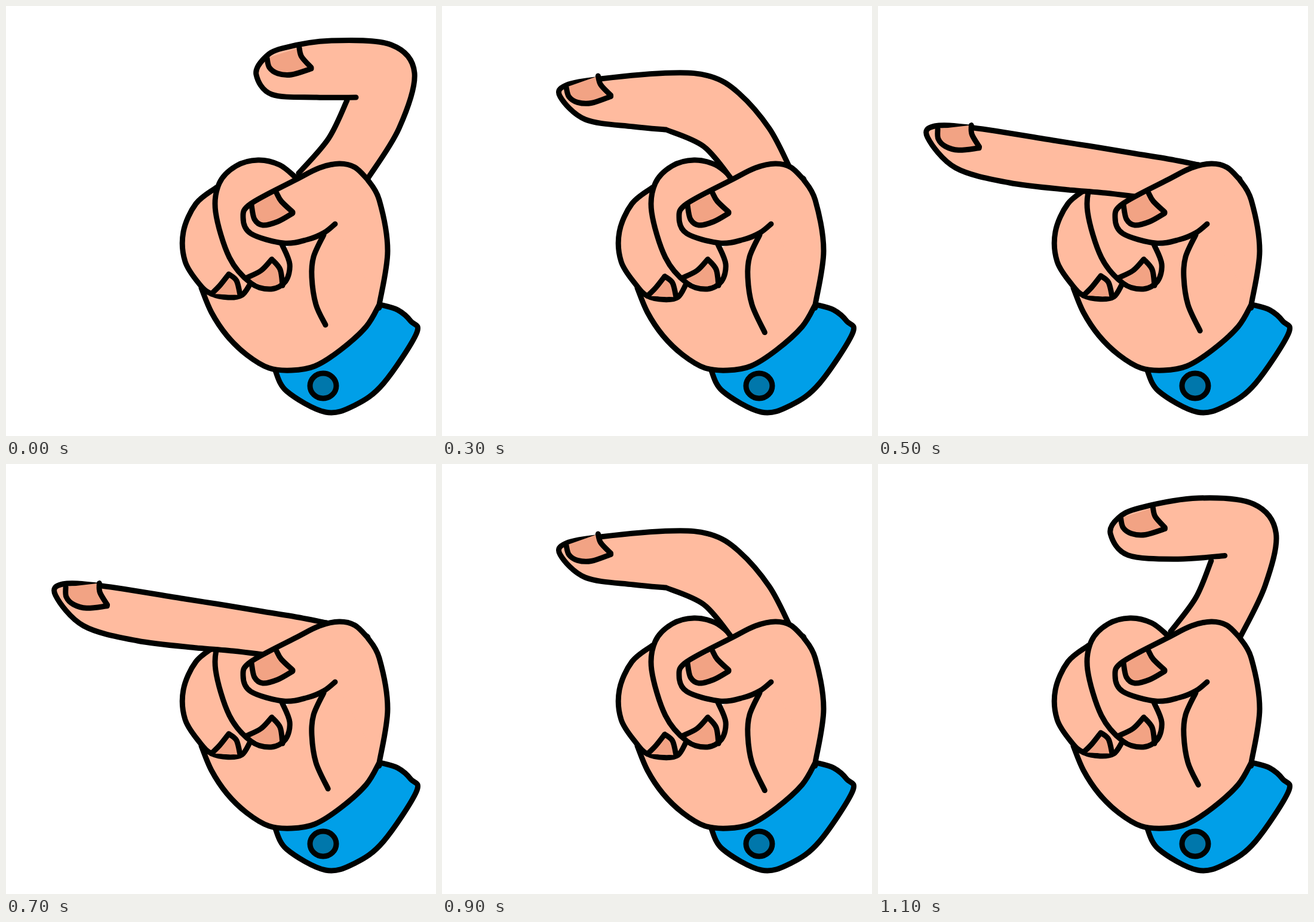
Animation of 720 by 720 pixels, one loop 1200 ms. Source, as an HTML page:

```html
<!DOCTYPE html>
<html lang="en">
<head>
<meta charset="utf-8">
<title>Beckoning finger</title>
<style>
  html, body { margin: 0; width: 100%; height: 100%; overflow: hidden; background: #fff; }
  svg { display: block; width: 100vw; height: 100vh; }
  path, ellipse { stroke: #000200; stroke-width: 9; stroke-linecap: round; stroke-linejoin: round; }
  .line { fill: none; }
  .flat { stroke: none; }
  .skin { fill: #ffbb9f; }
  .nail { fill: #f2a384; }
  .cuff { fill: #009fe8; }
  .button { fill: #0077ab; }
  /* Poses stand side by side; the strip steps out and back. */
  #strip { animation: beckon 1200ms infinite; }
  @keyframes beckon {
    0% { transform: translateX(0); animation-timing-function: steps(6, end); }
    50% { transform: translateX(-4320px); animation-timing-function: steps(6, end); }
    100% { transform: translateX(0); }
  }
</style>
</head>
<body>
<svg viewBox="0 0 720 720"><g id="strip"></g></svg>
<script>
const points = text => text.split(' ').map(p => p.split(',').map(Number));

// Smooth curve through the points, as cubic segments
function curve(pts, start = 'M') {
  const at = i => pts[Math.max(0, Math.min(pts.length - 1, i))];
  let d = start + pts[0];
  for (let i = 0; i < pts.length - 1; i++) {
    const [a, b, c, e] = [-1, 0, 1, 2].map(k => at(i + k));
    const c1 = b.map((v, k) => v + (c[k] - a[k]) / 6);
    const c2 = c.map((v, k) => v - (e[k] - b[k]) / 6);
    d += `C${c1} ${c2} ${c}`;
  }
  return d;
}

// Curves separated by "|" meet in a corner
const smooth = text => text.split('|').map((s, i) => curve(points(s), i ? 'L' : 'M')).join('');

// Blend two poses of the same structure; t above 1 overshoots
function mix(a, b, t) {
  if (typeof a === 'number') return a + (b - a) * t;
  if (Array.isArray(a)) return a.map((v, i) => mix(v, b[i], t));
  return Object.fromEntries(Object.keys(a).map(k => [k, mix(a[k], b[k], t)]));
}

// nail: x, y, angle; sag: how far the ring finger and palm crease drop
const pose = (finger, fold, nail, sag) => ({ finger: points(finger), fold: points(fold), nail, sag });

const curled = pose(
  '605,290 658,205 684,112 645,65 545,58 462,71 432,88 419,115 445,148 520,153 586,153',
  '571,158 540,222 490,280', [437, 87, 0], 0);
const hooked = pose(
  '611,291 615,200 608,130 576,74 510,54 361,81 300,101 290,125 330,168 440,180 563,155',
  '514,175 506,230 490,282', [304, 102, 0], 1);
const arched = pose(
  '582,270 548,205 497,146 450,118 385,112 265,122 207,133 198,152 240,190 320,202 375,207',
  '375,207 438,235 485,290', [208, 136, -2], 0.9);
const straight = pose(
  '537,266 480,255 430,247 370,237 300,226 160,204 95,201 83,220 130,271 220,296 320,308',
  '320,308 380,313 430,319', [100, 206, 11], 0.7);

const poses = [
  curled, mix(curled, hooked, 0.23), hooked,
  arched, mix(arched, straight, 0.55), straight, mix(arched, straight, 1.25)
];

const path = (kind, d) => `<path class="${kind}" d="${d}"/>`;
const nail = d => path('nail flat', d + 'Z') + path('line', d);

const palm = '327,472 344,513 370,552 403,584 440,606 478,610 517,603 560,576 603,537 625,500';
const side = '625,500 639,410 625,325 605,290';
const thumb = '605,290 584,270 558,264 525,271 485,291 410,331 397,354 410,381 465,397 505,391 532,380 551,365';
const outline = smooth([palm, side, thumb].join(' '));
const middle = smooth('485,287 458,266 422,258 385,268 357,297 351,345 374,421 410,464 444,474 468,461 475,432 462,399');

const back = path('cuff', smooth('626,500 656,509 678,528 687,549 632,632 585,668 535,680 470,645 450,608')) +
  '<ellipse class="button" cx="531" cy="636" rx="22" ry="21"/>' +
  path('skin flat', outline);
const middleFinger = path('skin flat', middle) +
  path('nail flat', smooth('403,455 427,443 445,424|445,424 459,441 463,468') + 'L438,473Z') +
  path('line', smooth('403,455 427,443 445,424|445,424 459,441 463,468')) +
  path('line', middle);
const front = path('skin flat', smooth(`${side}|${thumb}`) + 'Z') +
  nail(smooth('411,333 416,357 430,367 455,361 480,347|480,345 461,327 453,313')) +
  path('line', outline);
const fingerNail = nail(smooth('0,0 4,16 18,26 41,28 74,18|74,16 58,-2 54,-17'));

function ringFinger(drop) {
  const tip = `translate(0 ${drop})`;
  return path('skin', smooth(`352,304 318,331 297,378 300,428 325,467 344,${482 + drop} 372,${488 + drop} 395,${484 + drop} 408,467`)) +
    `<g transform="${tip}">${path('nail', smooth('344,482 358,468 373,449|373,449 386,460 392,484'))}</g>`;
}

function indexFinger({ finger, fold, nail: [x, y, angle] }) {
  return path('skin flat', curve(finger) + curve(fold, 'L')) +
    path('line', curve(finger) + curve(fold)) +
    `<g transform="translate(${x} ${y}) rotate(${angle})">${fingerNail}</g>`;
}

const crease = sag => path('line', curve([[532, 383], [515, 420], [512, 454], [519, 500], [535 + 6 * sag, 534 + 14 * sag]]));

document.getElementById('strip').innerHTML = poses.map((p, i) =>
  `<g transform="translate(${i * 720})">` +
  back + ringFinger(4 * p.sag) + middleFinger + indexFinger(p) + front + crease(p.sag) +
  '</g>').join('');
</script>
</body>
</html>
```
